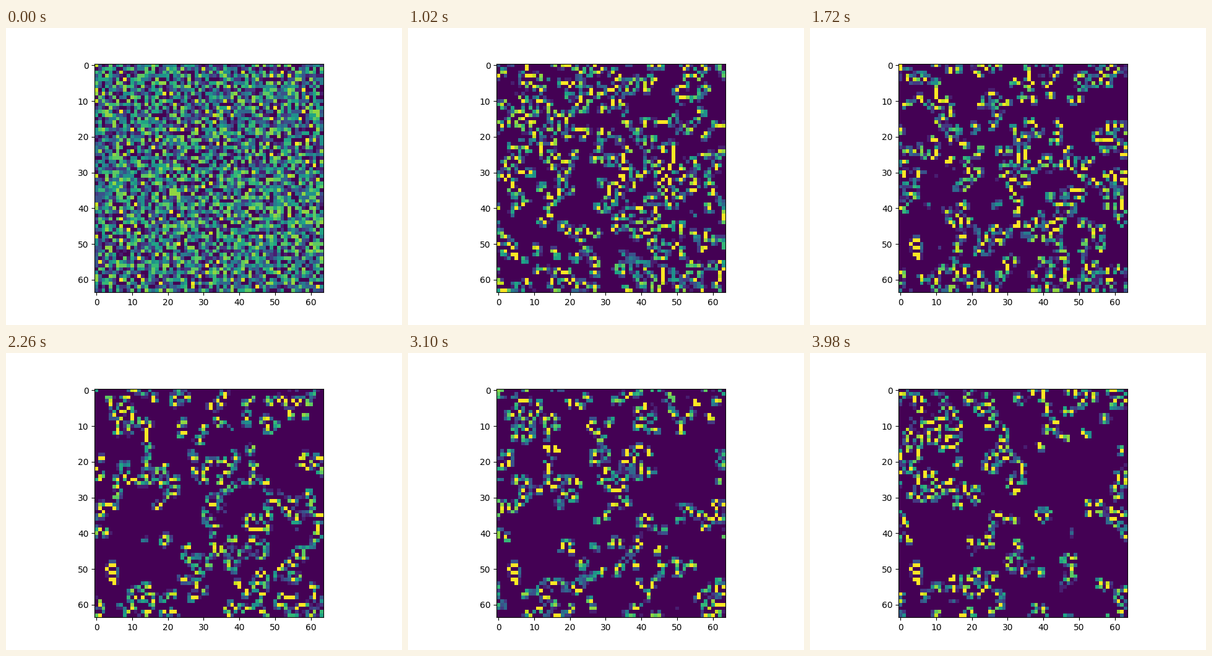
Write a matplotlib script that moves like this. It is 640x480 px and loops after 4 s.

```python
import numpy as np
import matplotlib.pyplot as plt
from matplotlib.animation import FuncAnimation

SIZE, STATES = 64, 12
FRAMES, INTERVAL = 200, 20
WARMUP = 2
OFFSETS = [(i, j) for i in (-1, 0, 1) for j in (-1, 0, 1) if i or j]


def growth(u):
    grow = (u >= 20) & (u <= 24)
    decay = (u <= 18) | (u >= 32)
    return grow.astype(int) - decay


def step(cells):
    """One update of the multi-state Game of Life on a torus."""
    total = sum(np.roll(cells, shift, (0, 1)) for shift in OFFSETS)
    return np.clip(cells + growth(total), 0, STATES)


np.random.seed(0)
history = [np.random.randint(STATES + 1, size=(SIZE, SIZE))]
for _ in range(FRAMES + WARMUP - 1):
    history.append(step(history[-1]))

fig, ax = plt.subplots(figsize=(6.4, 4.8), dpi=100)
img = ax.imshow(history[WARMUP], cmap="viridis", vmin=0, vmax=STATES,
                interpolation="nearest")


def update(i):
    img.set_array(history[i + WARMUP])
    return [img]


anim = FuncAnimation(fig, update, frames=FRAMES, interval=INTERVAL,
                     repeat=True, repeat_delay=0)
plt.show()
```
